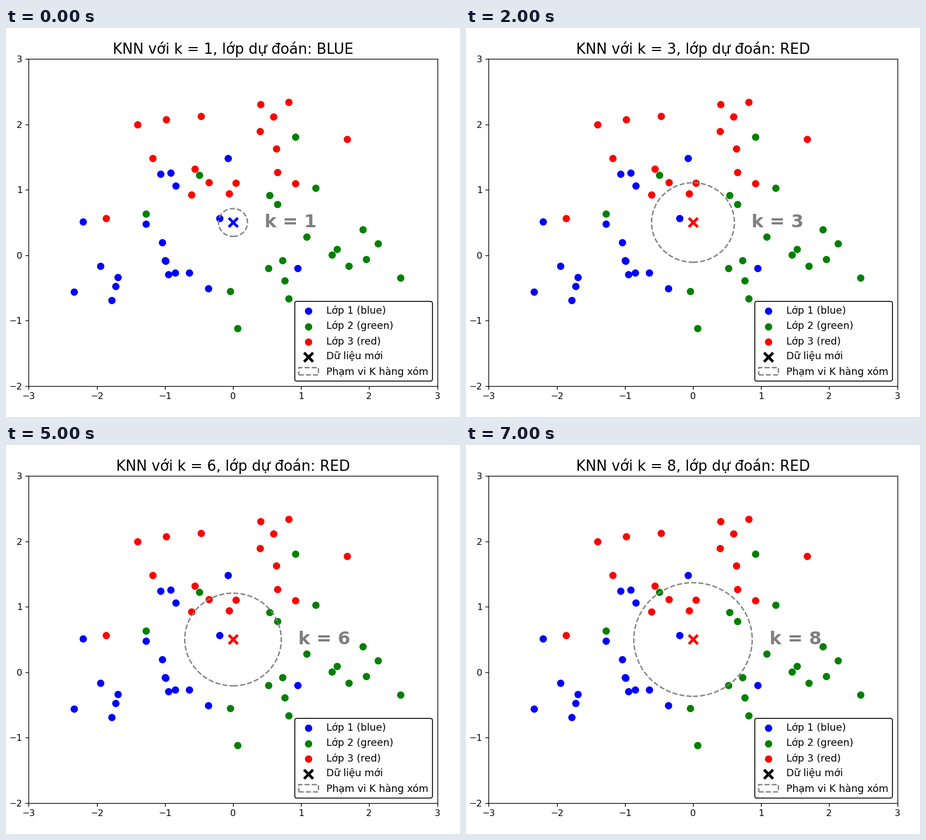
Animation, 808 px wide and 693 px high, one loop 8 s. Source, as a matplotlib script:

```python
import numpy as np
import matplotlib.pyplot as plt
from matplotlib.animation import FuncAnimation
from matplotlib.patches import Circle

W, H, DPI = 808, 693, 115.5
COLORS = ["blue", "green", "red"]
QUERY = np.array([0, 0.5])

blue = np.array([
    (-2.207, 0.512), (-1.283, 0.482), (-1.068, 1.247), (-0.912, 1.260),
    (-0.842, 1.062), (-0.078, 1.483), (-0.202, 0.568), (-1.040, 0.194),
    (-1.002, -0.080), (-0.994, -0.088), (-0.949, -0.291), (-0.846, -0.265),
    (-0.646, -0.265), (-0.363, -0.510), (-1.950, -0.167), (-1.694, -0.338),
    (-1.727, -0.476), (-2.331, -0.564), (-1.782, -0.690), (0.945, -0.201)])
green = np.array([
    (-0.498, 1.225), (-1.283, 0.630), (0.916, 1.807), (1.215, 1.032),
    (0.540, 0.919), (0.651, 0.775), (1.083, 0.283), (1.910, 0.392),
    (2.131, 0.175), (1.526, 0.095), (1.455, 0.005), (1.955, -0.063),
    (1.702, -0.162), (2.459, -0.347), (0.730, -0.082), (0.521, -0.196),
    (0.759, -0.387), (0.813, -0.664), (-0.045, -0.553), (0.068, -1.120)])
red = np.array([
    (-1.403, 1.998), (-0.982, 2.080), (-0.474, 2.130), (-1.184, 1.483),
    (-0.564, 1.324), (-0.356, 1.113), (-0.607, 0.929), (-0.058, 0.942),
    (0.041, 1.107), (0.402, 2.312), (0.817, 2.346), (0.598, 2.119),
    (0.398, 1.895), (0.635, 1.633), (0.654, 1.268), (0.917, 1.096),
    (1.672, 1.775), (-1.865, 0.561)])

classes = [blue, green, red]
labels = np.repeat([0, 1, 2], [len(c) for c in classes])
dist = np.linalg.norm(np.vstack(classes) - QUERY, axis=1)
order = np.argsort(dist)

plt.rcParams["font.family"] = "DejaVu Sans"
fig, ax = plt.subplots(figsize=((W + 0.01) / DPI, (H + 0.01) / DPI), dpi=DPI)
fig.subplots_adjust(left=0.05, right=0.95, bottom=0.08, top=0.92)
ax.set(xlim=(-3, 3), ylim=(-2, 3))

for i, (pts, color) in enumerate(zip(classes, COLORS), 1):
    ax.scatter(*pts.T, s=50, color=color, label=f"Lớp {i} ({color})")
cross_style = dict(s=100, marker="x", linewidths=3)
ax.scatter([], [], color="black", label="Dữ liệu mới", **cross_style)
cross = ax.scatter(*QUERY, color="blue", **cross_style)
ring = ax.add_patch(Circle(QUERY, 0.2, fill=False, color="gray", ls="--",
                           lw=1.5, label="Phạm vi K hàng xóm"))
note = ax.text(0, QUERY[1], "", fontsize=20, weight="bold", color="gray",
               va="center")
title = ax.set_title("", fontsize=16)
ax.legend(loc="lower right", fontsize=11, framealpha=1, edgecolor="black")


def update(frame):
    k = frame + 1
    near = order[:k]
    votes = np.bincount(labels[near], minlength=3)
    color = COLORS[votes.argmax()]
    radius = dist[near[-1]]
    cross.set_color(color)
    ring.set_radius(radius)
    note.set_text(f"k = {k}")
    note.set_x(radius + 0.25)
    title.set_text(f"KNN với k = {k}, lớp dự đoán: {color.upper()}")
    return cross, ring, note, title


anim = FuncAnimation(fig, update, frames=8, interval=1000, repeat=True,
                     repeat_delay=0, blit=False)
plt.show()
```
